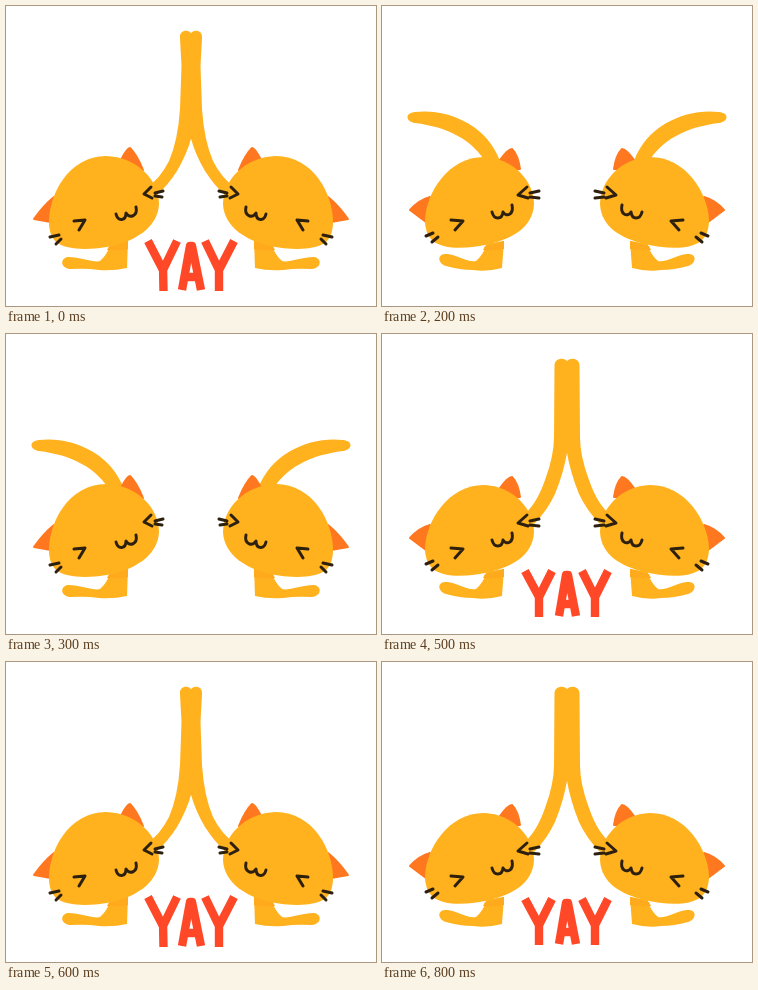
Animation, 370 px wide and 300 px high, one loop 0.9 s. Source, as an HTML page:

```html
<!DOCTYPE html>
<html lang="en">
<head>
<meta charset="utf-8">
<title>Clapping cats</title>
<style>
  html, body { margin: 0; width: 100%; height: 100%; overflow: hidden; background: #fff; }
  svg { display: block; width: 370px; height: 300px; }
  .fur { fill: #ffb21e; }
  .shade { fill: #ffa91c; }
  .ear { fill: #ff7820; stroke: #ff7820; stroke-width: 2; stroke-linejoin: round; }
  .ink { fill: none; stroke: #2e200e; stroke-width: 3; stroke-linecap: round; stroke-linejoin: round; }
  .yay { fill: none; stroke: #ff4827; stroke-width: 8.4; stroke-linejoin: round; }
</style>
</head>
<body>
<svg viewBox="0 0 370 300" role="img" aria-label="Two cats clapping: YAY">
  <g id="cat">
    <path id="leg" class="fur"/>
    <path id="shade" class="shade" d="M103 240L122 235V243Q111 245 101 244Z"/>
    <path id="arm" class="fur"/>
    <path id="ears" class="ear"/>
    <path id="head" class="fur"/>
    <path id="face" class="ink"/>
  </g>
  <use href="#cat" transform="matrix(-1 0 0 1 370 0)"/>
  <path id="yay" class="yay"/>
</svg>
<script>
const STEP = 100;

// Three drawings of the cat, cycled for a hand-drawn wobble.
const looks = [
  {
    leg: "M104 238L122 234L121 262Q108 265 93 264Q80 262 64 263C54 262 54 252 62 251C75 251 88 257 94 255Q100 250 104 240Z",
    ears: "M28 213Q38 199 48 191L45 216ZM115 154Q121 142 124 142Q131 149 137 164L118 165Z",
    head: "M43 216C43 188 63 150 100 150C131 151 153 174 153 198C152 222 128 235 106 240C85 244 62 245 50 236C45 231 43 224 43 216Z",
    face: "M68 215L79 214L73 224M145 181L138 188L146 192M149 187L157 185M149 190L156 191M44 231L53 229M50 238L55 233M110 208C112 216 120 215 120 207C124 213 132 210 130 201",
    yay: "M142 235L157 264L171 235M157 260L157.500 285M176 284L184 240H186L195 284M178 271H192M199 235L213 264L228 235M213 260L213 285"
  },
  {
    leg: "M104 238L122 235L120 262Q107 264 95 264Q80 264 64 266C54 266 54 254 62 253C75 253 87 257 95 255Q101 249 104 240Z",
    ears: "M28 219Q37 203 47 192L43 219ZM114 153Q117 143 120 142Q127 149 133 161L120 164Z",
    head: "M43 216C43 190 62 155 90 152C125 147 152 174 153 196C151 216 142 230 127 235C108 242 76 243 58 240C47 238 43 227 43 216Z",
    face: "M68 216L81 214L74 226M145 181L138 190L146 191M149 186L158 185M150 190L157 192M43 231L51 229M50 238L56 232M110 207C113 215 121 213 121 205C125 210 131 206 129 199",
    yay: "M142 236L157 263L171 236M157 260L157 284M176 283L184 240H186L195 283M178 270H192M199 236L213 263L227 236M213 260L213 284"
  },
  {
    leg: "M104 238L122 235L120 262Q105 266 91 264Q78 264 64 260C55 257 55 247 65 248C76 249 86 257 94 255Q101 249 104 240Z",
    ears: "M28 204Q37 194 48 191L44 216ZM118 154Q126 143 130 143Q136 149 138 163L120 164Z",
    head: "M43 214C44 187 66 151 102 151C131 152 152 175 152 198C151 221 131 232 108 238C86 243 62 244 51 235C45 230 43 222 43 214Z",
    face: "M69 214L81 215L73 224M145 181L136 189L146 192M148 187L157 185M148 191L157 192M44 230L51 227M50 236L56 231M110 206C112 214 120 214 121 206C125 212 132 208 130 199",
    yay: "M143 237L157 263L170 237M157 260L157 283M177 282L184 241H186L194 282M179 270H191M200 237L213 263L226 237M213 260L213 283"
  }
];

const arms = {
  clap: "M174 32C173 23 184 23 185.5 28V131Q181 148 171 165Q162 179 152 188L140 182Q154 173 163 155Q172 134 174 103L175.500 60Z",
  press: "M172.500 32C172 23 184 23 185.5 28V116Q182 138 173 160Q165 177 152 190L140 182Q154 172 163 146Q172 122 172 103Z",
  sweep: "M177 26Q184 24 185.5 41V105Q184 142 170 168Q158 182 153 198L120 190L113 154Q95 123 65 112L40 108Q32 106 35 97C48 74 118 27 177 26Z",
  open: "M33 106C64 102 105 118 118 155L106 160C91 133 65 121 33 117C23 115 23 107 33 106Z",
  swing: "M148 32C170 32 176 49 180 70Q183 90 182 120Q178 150 164 173Q157 184 153 197L122 190L124 140Q123 112 118 85C112 53 119 33 148 32Z"
};

const poses = ["clap", "sweep", "open", "open", "swing", "press", "clap", "press", "press"];
const silent = [2, 3, 4];
const part = id => document.getElementById(id);
let shown = -1;

function draw(now) {
  const step = Math.floor(now / STEP) % poses.length;
  if (step !== shown) {
    shown = step;
    const look = looks[step % looks.length];
    for (const id in look) part(id).setAttribute("d", look[id]);
    part("arm").setAttribute("d", arms[poses[step]]);
    part("yay").style.display = silent.includes(step) ? "none" : "";
  }
}

const start = performance.now();
function tick() {
  draw(performance.now() - start);
  requestAnimationFrame(tick);
}
tick();
</script>
</body>
</html>
```
